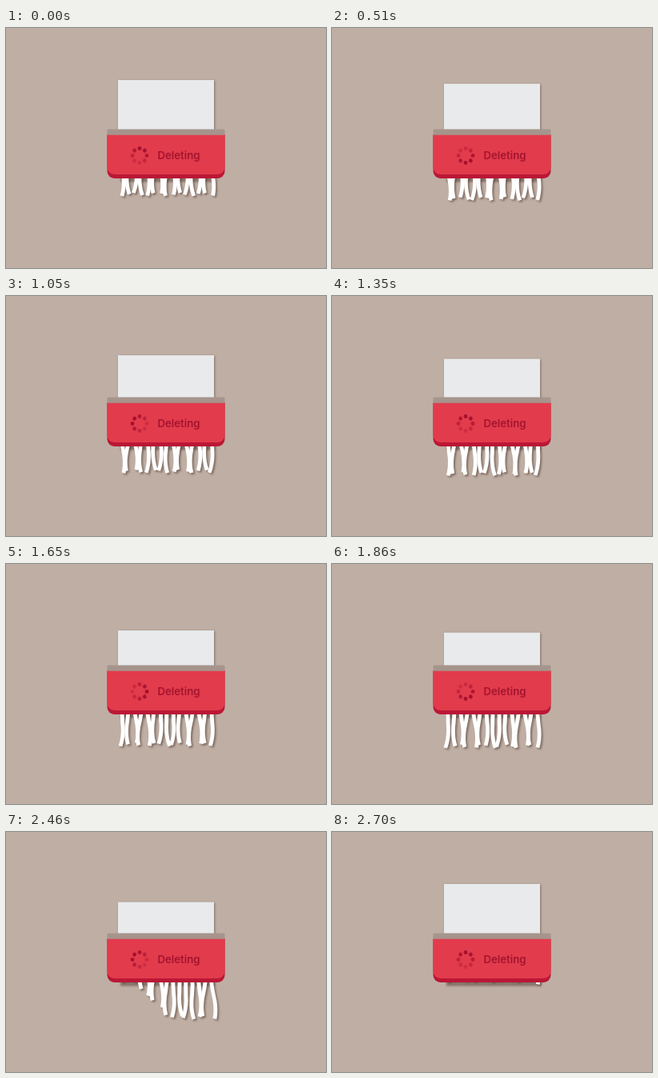
These frames come from a looping animation (400 px wide and 300 px high, 2730 ms). An HTML page without scripts:

```html
<!DOCTYPE html>
<html lang="en">
<head>
<meta charset="utf-8">
<title>Deleting</title>
<style>
  /* Shared clock in milliseconds */
  @property --t { syntax: "<number>"; inherits: true; initial-value: 0; }

  html, body { margin: 0; width: 100%; height: 100%; overflow: hidden; background: #bfaea4; }
  svg {
    display: block; width: 100%; height: 100%;
    animation: clock 2730ms steps(91) infinite;
  }
  @keyframes clock { from { --t: 0; } to { --t: 2730; } }

  .paper {
    fill: #e8eaec;
    filter: drop-shadow(1.5px 1.5px 1.5px rgba(70, 50, 40, .5));
    animation: feed 2730ms linear infinite;
  }
  @keyframes feed {
    0% { transform: translateY(0); }
    19% { transform: translateY(4.7px); }
    39% { transform: translateY(9.2px); }
    60.4% { transform: translateY(18px); }
    80.2% { transform: translateY(25px); }
    86.5% { transform: translateY(25.6px); animation-timing-function: cubic-bezier(.6, 0, .4, 1); }
    99%, 100% { transform: translateY(0); }
  }

  .strips {
    fill: none; stroke: #fff; stroke-width: 4.8;
    filter: drop-shadow(2px 2.5px 1.2px rgba(70, 50, 40, .5));
  }
  /* Each strip is fed out, sways, then is pulled back in turn from the left */
  .strips use {
    --flip: 1;
    --p: clamp(0, (var(--t) - 2288 - var(--i) * 20) / 160, 1);
    --back: (var(--p) * var(--p) * (3 - 2 * var(--p)));
    --ragged: (2 * sin(var(--i) * 100deg + 90deg) - 2);
    --out: (22 + var(--ragged) + min(var(--t), 2240) * .0107 - 47 * var(--back));
    --lean: calc(5deg * sin(var(--i) * 137deg + var(--t) * .13deg));
    transform: translate(calc(145px + var(--i) * 8px), 188px) skewX(var(--lean))
      translateY(calc(1px * var(--out))) scaleX(var(--flip));
  }
  .strips use:nth-child(even) { --flip: -1; }

  .spinner { transform: translate(167px, 159.5px); fill: #a3102c; }
  .spinner circle {
    transform: rotate(calc(var(--i) * 45deg)) translateY(-9px);
    opacity: calc(.65 + .35 * cos(var(--t) * 360deg / 1365 + 20deg - var(--i) * 45deg));
  }
  .slot { fill: rgba(80, 60, 50, .5); filter: blur(1px); }
  text { font: 600 13.2px Inter, Roboto, sans-serif; fill: #a3142f; }
</style>
</head>
<body>
<svg viewBox="0 0 400 300">
  <defs>
    <path id="strip" d="M0 0C2 -7 2.600 -14 2 -22S-1 -38 0 -54"/>
  </defs>

  <rect class="paper" x="140" y="65" width="120" height="80"/>
  <rect class="slot" x="143" y="183" width="118" height="9.500"/>

  <g class="strips">
    <use href="#strip" style="--i:0"/>
    <use href="#strip" style="--i:1"/>
    <use href="#strip" style="--i:2"/>
    <use href="#strip" style="--i:3"/>
    <use href="#strip" style="--i:4"/>
    <use href="#strip" style="--i:5"/>
    <use href="#strip" style="--i:6"/>
    <use href="#strip" style="--i:7"/>
    <use href="#strip" style="--i:8"/>
    <use href="#strip" style="--i:9"/>
    <use href="#strip" style="--i:10"/>
    <use href="#strip" style="--i:11"/>
    <use href="#strip" style="--i:12"/>
    <use href="#strip" style="--i:13"/>
    <use href="#strip" style="--i:14"/>
  </g>

  <path fill="#bb1736" d="M126.500 133H273.500V179a9 9 0 0 1-9 9H135.500a9 9 0 0 1-9-9Z"/>
  <path fill="#e23b4c" d="M126.500 133H273.500V174a9 9 0 0 1-9 9H135.500a9 9 0 0 1-9-9Z"/>
  <path fill="#a6958c" d="M126.500 133.800V128q0-1.500 1.500-1.500H272q1.500 0 1.500 1.500V133.800Z"/>

  <g class="spinner">
    <circle r="2.4" style="--i:0"/>
    <circle r="2.4" style="--i:1"/>
    <circle r="2.4" style="--i:2"/>
    <circle r="2.4" style="--i:3"/>
    <circle r="2.4" style="--i:4"/>
    <circle r="2.4" style="--i:5"/>
    <circle r="2.4" style="--i:6"/>
    <circle r="2.4" style="--i:7"/>
  </g>
  <text x="189.500" y="164">Deleting</text>
</svg>
</body>
</html>
```
